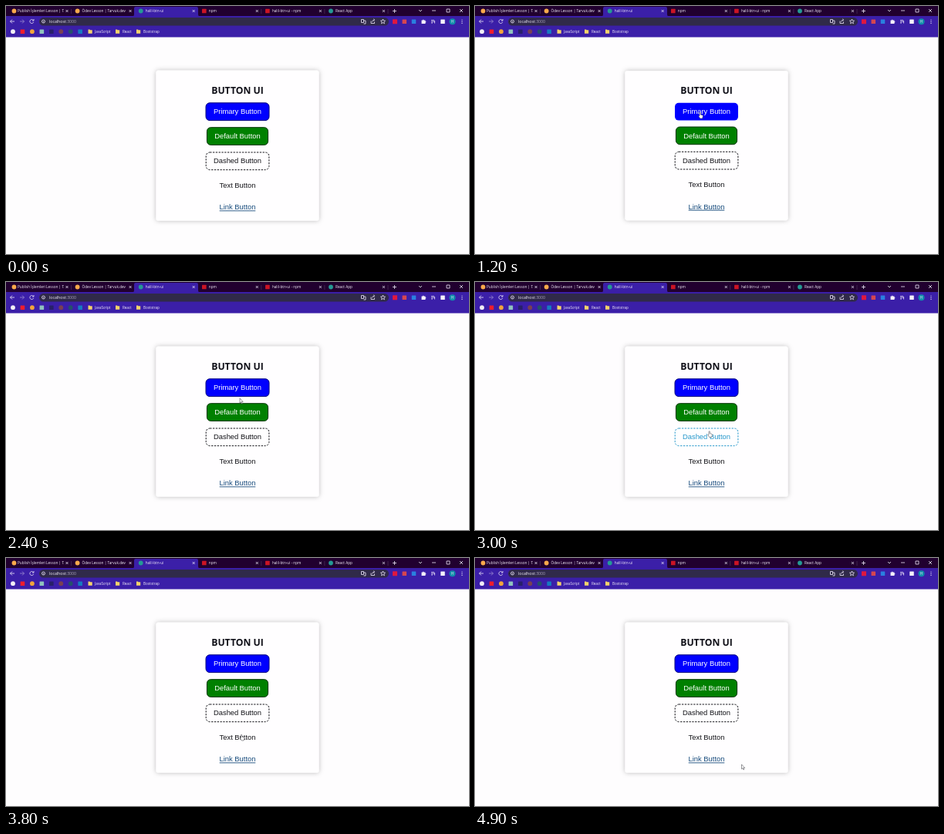
Animation of 600 by 322 pixels, one loop 5000 ms. Source, as an HTML page:

```html
<!DOCTYPE html>
<html lang="en">
<head>
<meta charset="utf-8">
<title>Button UI</title>
<style>
  html, body { margin: 0; width: 100%; height: 100%; overflow: hidden; background: #fefdfe; }
  svg { display: block; width: 600px; height: 322px; }
  .ui { font-family: "Open Sans", "Noto Sans", sans-serif; font-size: 4.7px; fill: #f4f0fa; }
  .bookmark { font-size: 4.5px; }
  .url { font-size: 5.2px; }
  .title { font: 700 12.2px "Open Sans", "Noto Sans", sans-serif; fill: #101018; text-anchor: middle; }
  .label { font: 9.38px "Liberation Sans", Arial, sans-serif; text-anchor: middle; }
  .line { fill: none; stroke: #eee8f8; stroke-width: .8; }
</style>
</head>
<body>
<svg viewBox="0 0 600 322">
  <defs>
    <filter id="shadow" x="-10%" y="-10%" width="120%" height="120%">
      <feDropShadow dx="0" dy="0" stdDeviation="3" flood-color="#000" flood-opacity=".27"/>
    </filter>
    <clipPath id="firstTab"><rect width="75" height="14"/></clipPath>
  </defs>

  <rect width="600" height="322" fill="#fefdfe"/>
  <rect width="600" height="14" fill="#21002f"/>
  <rect y="13" width="600" height="27.5" fill="#3b1fa8"/>
  <path d="M164 13.5q2-.3 2-2.5V3q0-2 2-2h79q2 0 2 2v8q0 2.200 2 2.500z" fill="#3b1fa8"/>
  <rect x="43" y="15" width="453" height="10.500" rx="5.200" fill="#302a49"/>
  <g id="chrome"></g>

  <g class="line">
    <path d="M535 5l2 2 2-2M552 6h5M571 4h4v4h-4zM588 4l4 4m0-4l-4 4M501 6.500h5M503.500 4v5"/>
    <path d="M11 20H5.500m2.500-2.500L5.500 20 8 22.500"/>
    <path d="M18 20h5.500m-2.500-2.500l2.500 2.500-2.500 2.500" stroke="#9c8bd0"/>
    <path d="M35.500 18.700a2.500 2.500 0 1 0 .3 2M36 17v2h-2"/>
    <circle cx="48.500" cy="20" r="2"/><path d="M48.500 19.700v1.300"/>
    <path d="M460.500 17.500h3v4h-3zM463.500 19h2.500v4h-2.500M473 19.500v3h4.500v-2M474.500 20.500q.5-2.500 3-2.500m-1.200-1.300l1.400 1.300-1.400 1.300"/>
    <path d="M488.500 17l.9 2 2.100.2-1.600 1.400.5 2.200-1.900-1.200-1.900 1.200.5-2.200-1.600-1.400 2.100-.2z"/>
    <path d="M551 18.500h4M551 20.300h4M551 22h2M555.500 19v3.500"/>
  </g>
  <path d="M538.500 18.500h1.500q.8-2.200 1.600 0h1.900v1.600q2 .7 0 1.500v1.400h-5z" fill="#f4f0fa"/>

  <g id="card">
    <rect id="panel" x="194.500" y="83.700" width="211" height="195" rx="3" fill="#fffeff" filter="url(#shadow)"/>
    <text class="title" x="300" y="113.800">BUTTON UI</text>
    <rect id="primary" x="259" y="125.800" width="82" height="22.800" rx="5" fill="#00f" stroke="#000079"/>
    <text class="label" x="300" y="140.400" fill="#fff">Primary Button</text>
    <g id="lower">
      <rect x="260.400" y="157.700" width="79.200" height="22.700" rx="5" fill="#008000" stroke="#053205"/>
      <text class="label" x="300" y="172.400" fill="#fff">Default Button</text>
      <rect id="dashed" x="259.200" y="190" width="81.700" height="22.700" rx="5" fill="none" stroke-dasharray="2.300 1.500"/>
      <text id="dashedText" class="label" x="300" y="204.400">Dashed Button</text>
      <text class="label" x="300" y="235.700" fill="#15151a">Text Button</text>
      <text id="linkText" class="label" x="300" y="264.300">Link Button</text>
      <path id="underline" d="M276.700 265.900h46.600" stroke-width=".9"/>
    </g>
  </g>

  <g id="cursor" stroke="#44444c" stroke-width=".55" fill="#fff" stroke-linejoin="round">
    <path id="arrow" d="M0 0v6l1.400-1.200 1 2.200 .9-.4-1-2.100h1.900z"/>
    <path id="hand" d="M-.5 .6q.7-1 1.300 0v2.500l2.500.7q.8.300.5 1.500L3.200 8H.2L-1.700 5q.2-1 1.200-.2z"/>
  </g>
</svg>

<script>
const $ = id => document.getElementById(id);
const LOOP = 5000, STEP = 100;

// Browser furniture
const text = (x, y, str, cls = "", extra = "") =>
  `<text class="ui ${cls}" x="${x}" y="${y}" ${extra}>${str}</text>`;
const dot = (x, y, color, r = 2.9) => `<circle cx="${x}" cy="${y}" r="${r}" fill="${color}"/>`;
const box = (x, y, color, s = 5.6) =>
  `<rect x="${x - s / 2}" y="${y - s / 2}" width="${s}" height="${s}" rx=".5" fill="${color}"/>`;
const folder = x => `<path d="M${x} 30.500h2l.7.8h2.500v4.500H${x}z" fill="#f6d36b"/>`;

const tabs = [
  ["Publish İşlemleri Lesson | Tarvuk.dev", dot, "#f9a94b"],
  ["Ödev Lesson | Tarvuk.dev", dot, "#f9a94b"],
  ["halil-btn-ui", dot, "#249a94"],
  ["npm", box, "#cb1424"],
  ["halil-btn-ui - npm", box, "#cb1424"],
  ["React App", dot, "#249a94"]
];
const tabMarkup = tabs.map(([name, icon, color], i) => {
  const x = 10.5 + i * 82.1;
  const close = `<path class="line" d="M${x + 67} 5l3 3m0-3l-3 3"/>`;
  const label = text(x + (i ? 6 : 4.5), 8.2, name, "", i ? "" : 'clip-path="url(#firstTab)"');
  const divider = i === 0 || i > 2 ? `<path d="M${x + 74} 4v6" stroke="#61486f" stroke-width=".5"/>` : "";
  return icon(x, 6.5, color) + label + close + divider;
}).join("");

const bookmarks = [
  [dot, "#f1eef5"], [box, "#f11d2c"], [dot, "#f1a43c"], [box, "#8fc2bd"],
  [box, "#282069"], [dot, "#794052"], [dot, "#24516b"], [box, "#167bc0"]
].map(([shape, color], i) => shape(9 + i * 12.45, 33.2, color)).join("");

const folders = [[106.5, 115, "JavaScript"], [142, 151, "React"], [169, 178, "Bootstrap"]]
  .map(([x, tx, name]) => folder(x) + text(tx, 34.9, name, "bookmark")).join("");

const extensions = box(504, 20.3, "#df183f", 6) + box(516.3, 20.3, "#d54650", 5.5) +
  box(528.5, 20.3, "#2a80df", 5.5) + box(566, 20.3, "#f5f2fa", 5.5) +
  dot(578.5, 20.3, "#118daa", 4) + text(578.5, 21.8, "H", "", 'text-anchor="middle"') +
  [18, 20.2, 22.4].map(y => dot(591, y, "#f4f0fa", .6)).join("");

$("chrome").innerHTML = tabMarkup + bookmarks + folders + extensions +
  text(56, 22, 'localhost<tspan fill="#aaa4bd">:3000</tspan>', "url");

// Pointer stops: time, x, y; travel between stops is linear, sampled every STEP
const stops = [
  [300, 299, 301], [800, 299, 301], [1100, 293, 177], [1200, 291.5, 138],
  [1400, 289, 132], [1500, 289, 132], [1700, 303, 132], [2100, 303, 132],
  [2400, 303, 151], [2800, 303, 187], [3000, 303.5, 193.5], [3200, 304.5, 201],
  [3500, 305, 202], [3800, 305, 229], [4000, 305, 229], [4300, 305.5, 263],
  [4600, 306, 264], [4900, 345.5, 268], [5000, 345.5, 268]
];

function pointerAt(t) {
  const i = stops.findIndex(s => s[0] > t);
  const [t0, x0, y0] = stops[i - 1], [t1, x1, y1] = stops[i];
  const k = (t - t0) / (t1 - t0);
  return { x: x0 + (x1 - x0) * k, y: y0 + (y1 - y0) * k };
}

const buttons = {
  primary: [259, 125, 341, 149], default: [260, 157, 340, 181], dashed: [259, 189, 341, 213],
  text: [270, 221, 330, 243], link: [276, 254, 324, 268]
};
const hit = (p, [l, t, r, b]) => p.x >= l && p.x <= r && p.y >= t && p.y <= b;

function setAttrs(id, attrs) {
  for (const name in attrs) $(id).setAttribute(name, attrs[name]);
}

function render(time) {
  const t = Math.floor((time % LOOP) / STEP) * STEP;
  const visible = t >= 300;
  const p = visible ? pointerAt(t) : { x: -50, y: -50 };
  const over = Object.keys(buttons).find(name => hit(p, buttons[name]));

  const pressed = over === "primary";
  setAttrs("primary", { stroke: pressed ? "#00f" : "#000079", "stroke-width": pressed ? 0 : 1 });
  setAttrs("panel", pressed ? { y: 84.2, height: 194 } : { y: 83.7, height: 195 });
  setAttrs("lower", { transform: `translate(0 ${pressed ? -.7 : 0})` });

  const dashColor = over === "dashed" ? "#2497cb" : "#111116";
  setAttrs("dashed", { stroke: dashColor });
  setAttrs("dashedText", { fill: dashColor });
  const linkColor = over === "link" ? "#178fc4" : "#174b7c";
  setAttrs("linkText", { fill: linkColor });
  setAttrs("underline", { stroke: linkColor });

  setAttrs("cursor", { transform: `translate(${p.x} ${p.y})`, visibility: visible ? "visible" : "hidden" });
  $("arrow").style.display = over ? "none" : "";
  $("hand").style.display = over ? "" : "none";
}

const start = performance.now();
function tick() {
  render(performance.now() - start);
  requestAnimationFrame(tick);
}
tick();
</script>
</body>
</html>
```
